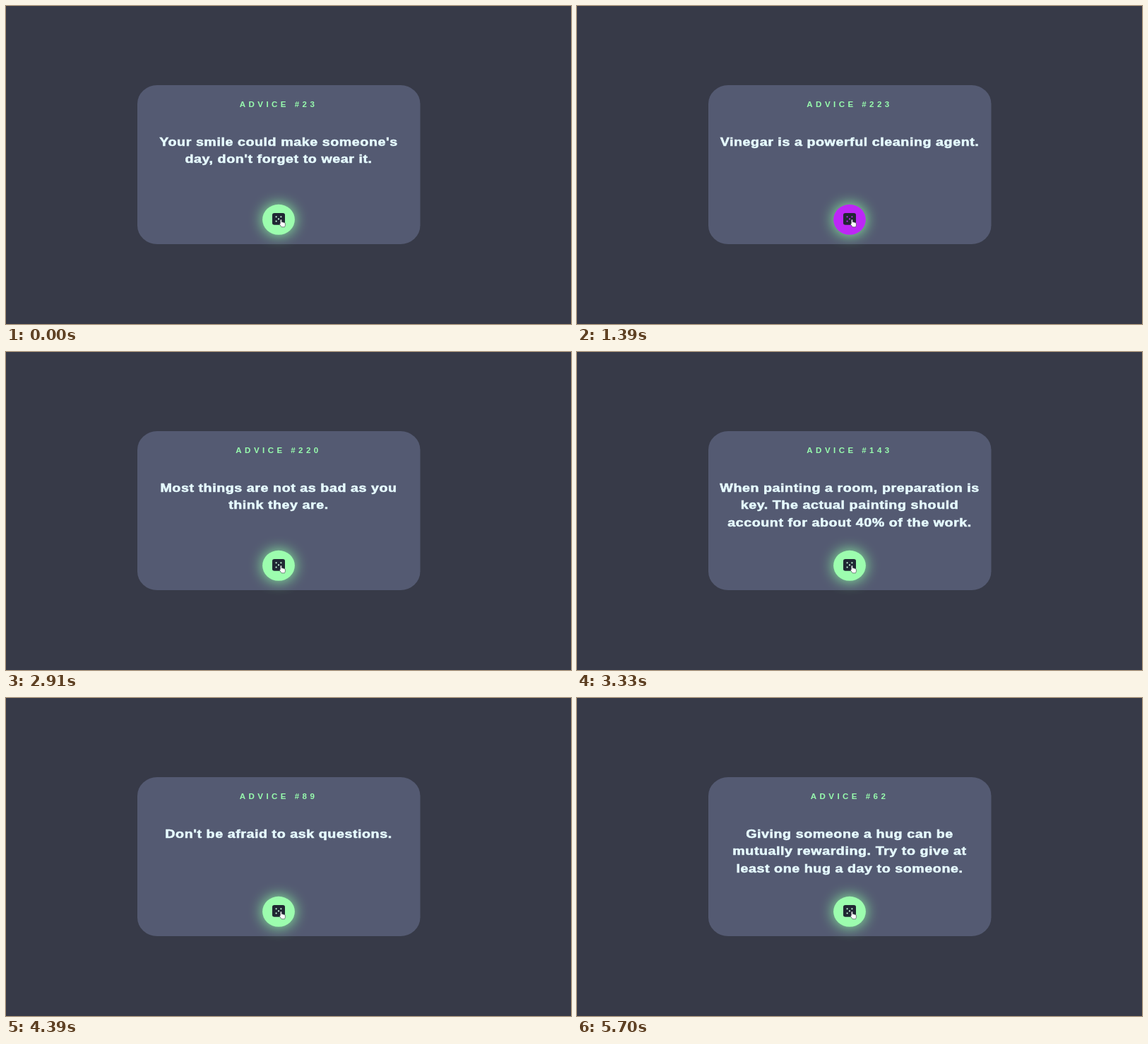
Animation, 800 px wide and 450 px high, one loop 5.79 s. Source, as an HTML page:

```html
<!DOCTYPE html>
<html lang="en">
<head>
<meta charset="utf-8">
<title>Advice generator</title>
<style>
  html, body { margin: 0; height: 100%; overflow: hidden; background: #373a48; }
  svg { display: block; width: 100vw; height: 100vh; }
  text { font-family: "Liberation Sans", Arial, sans-serif; font-weight: 700; text-anchor: middle; }
  #title { font-size: 10.8px; letter-spacing: 4.15px; fill: #98fdae; }
  #quote { font-size: 16.4px; letter-spacing: .46px; fill: #e6fbff; stroke: #e6fbff; stroke-width: .55px; }
  #button { filter: drop-shadow(0 0 10px #8dfda3); }
</style>
</head>
<body>
<svg viewBox="0 0 800 450">
  <rect x="186" y="112" width="400.5" height="225" rx="28" ry="26.5" fill="#545a72"/>
  <text id="title" transform="translate(386 143) scale(1.07 1)"></text>
  <g id="quote" transform="translate(386 198) scale(1.2 1)">
    <text></text>
    <text y="24.5"></text>
    <text y="49"></text>
  </g>
  <ellipse id="button" cx="386" cy="302.3" rx="22.9" ry="21.5"/>
  <rect x="377" y="293" width="18" height="16.8" rx="3" ry="2.8" fill="#202733"/>
  <g id="pips">
    <circle cx="382.6" cy="298.3" r="1.1"/>
    <circle cx="389.4" cy="298.3" r="1.1"/>
    <circle cx="386" cy="301.4" r="1.1"/>
    <circle cx="382.6" cy="304.6" r="1.1"/>
    <circle cx="389.4" cy="304.6" r="1.1"/>
  </g>
  <path d="M388.3 303q0-1.1 1-1.1t1 1.1v2.8q1.2-.5 1.8.3 1.1-.3 1.6.5 1.7-.2 1.7 1.3v2q0 1.3-1 2.9h-4.2l-2.6-3.6q-.8-1.4.7-1.3z"
        fill="#fff" stroke="#30343d" stroke-width=".6"/>
</svg>
<script>
const LOOP = 5790, RELEASE = 100, REPLY = 120;

// Each entry: click time, advice number, lines of text
const advice = [
  [-REPLY, 23, "Your smile could make someone's", "day, don't forget to wear it."],
  [520, 223, "Vinegar is a powerful cleaning agent."],
  [1390, 61, "Once in a while, eat some sweets you", "used to enjoy when you were", "younger."],
  [2300, 220, "Most things are not as bad as you", "think they are."],
  [3180, 143, "When painting a room, preparation is", "key. The actual painting should", "account for about 40% of the work."],
  [4270, 89, "Don't be afraid to ask questions."],
  [5210, 62, "Giving someone a hug can be", "mutually rewarding. Try to give at", "least one hug a day to someone."]
];

const get = id => document.getElementById(id);
const title = get("title"), button = get("button"), pips = get("pips");
const rows = [...get("quote").children];
const start = performance.now();
let shown;

function draw(now) {
  const t = Math.max(0, now - start) % LOOP;
  const item = advice.findLast(([click]) => t >= click + REPLY);
  if (item !== shown) {
    const [, number, ...lines] = shown = item;
    title.textContent = `ADVICE #${number}`;
    rows.forEach((row, i) => row.textContent = lines[i] || "");
  }
  const pressed = advice.some(([click]) => t >= click && t < click + RELEASE);
  const color = pressed ? "#bd27f6" : "#9cfdae";
  button.setAttribute("fill", color);
  pips.setAttribute("fill", pressed ? color : "#c9ffdc");
  requestAnimationFrame(draw);
}
draw(start);
</script>
</body>
</html>
```
